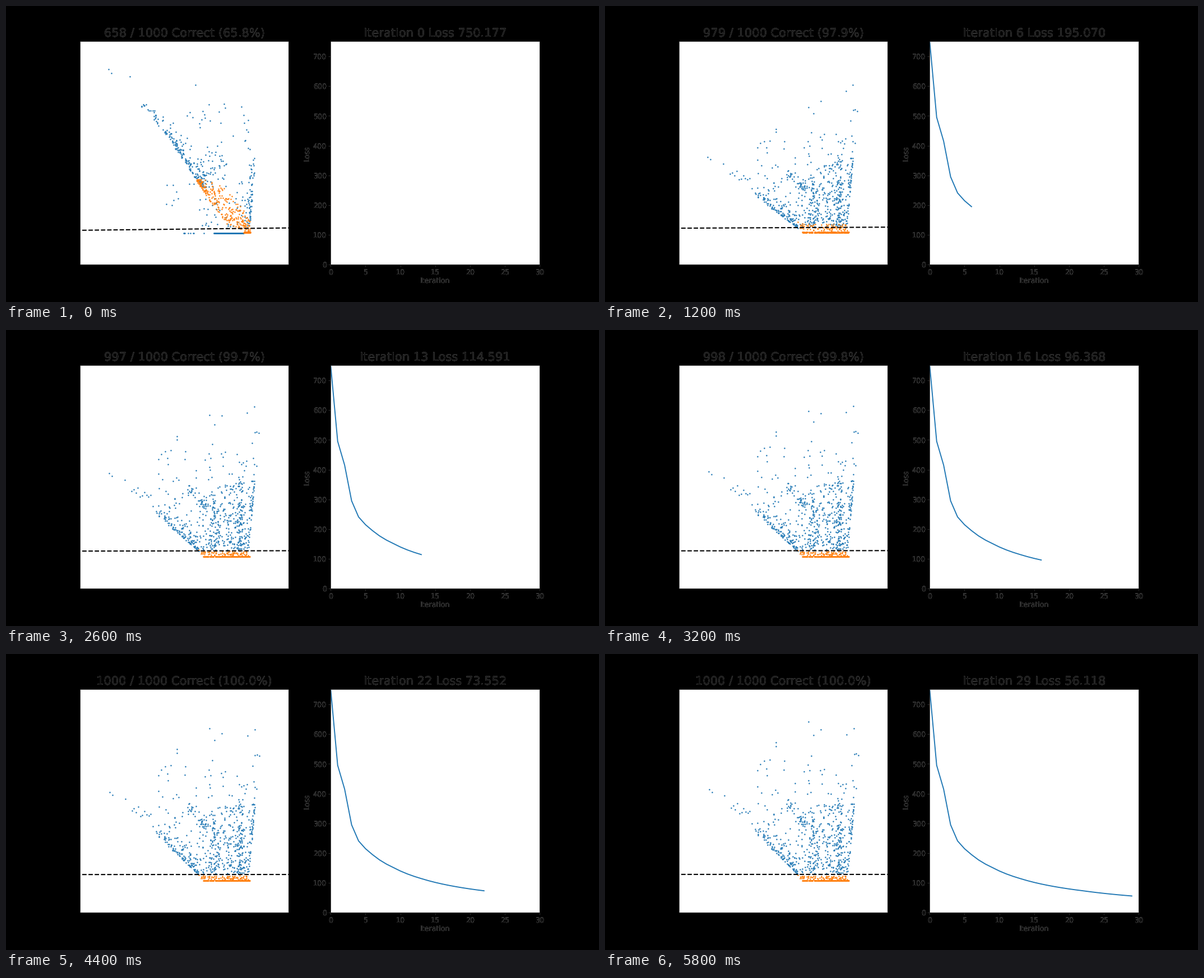
Write a matplotlib script that moves like this. It is 1058 by 529 pixels and loops after 6000 ms.

```python
import numpy as np
import matplotlib.pyplot as plt
from matplotlib.animation import FuncAnimation

W, H, STEPS = 1058, 529, 30
BLUE, ORANGE, DIM = "#1f77b4", "#ff7f0e", "#262626"
FLOOR = 405.5
N_BLUE, N_ORANGE = 640, 330
rng = np.random.default_rng(7)


def loss_at(t):
    keys = [0, 1, 2, 3, 4, 6, 9, 13, 19, 22, 29]
    vals = [750.177, 495.3, 415.2, 295.3, 241.1, 195.070, 151.627, 114.591,
            83.363, 73.552, 56.118]
    return np.exp(np.interp(np.log1p(t), np.log1p(keys), np.log(vals)))


def correct_at(t):
    return round(np.interp(t, [0, 1, 3, 6, 9, 13, 19], [658, 803, 934, 979, 992, 997, 1000]))


def early(t):
    """Share of the untrained layout left at iteration t."""
    base = loss_at(6)
    return max(0, (loss_at(t) - base) / (loss_at(0) - base))


def settle(t):
    """Progress of the slow drift after iteration 6."""
    return max(0, (t - 6) / 23) ** 0.6


def pack(x, y):
    return np.column_stack(np.broadcast_arrays(x, y))


def cluster(n, x0, x1, y0, y1):
    return pack(rng.uniform(x0, x1, n), rng.uniform(y0, y1, n))


def by_x(*parts):
    p = np.vstack(parts)
    return p[np.argsort(p[:, 0], kind="stable")]


def blue_start():
    lone = [(183, 113), (188, 120), (221, 126), (338, 141)]
    x = 226 + 127 * rng.beta(1.9, 1.1, 190)
    y = np.interp(x, [226, 265, 295, 325, 353], [162, 207, 245, 290, 330])
    ridge = pack(x + rng.exponential(7, 190), y - rng.exponential(3, 190))
    y = 270 + 128 * rng.beta(1.5, 1, 85)
    side = pack(447 - (y - 270) * 0.1 - rng.exponential(9, 85), y)
    parts = [lone, ridge, side,
             cluster(34, 320, 450, 175, 265), cluster(40, 340, 402, 265, 312),
             cluster(9, 285, 335, 310, 362), cluster(25, 338, 412, 340, 396),
             cluster(9, 317, 354, FLOOR, FLOOR)]
    rest = N_BLUE - sum(map(len, parts))
    return by_x(*parts, cluster(rest, 371, 424, FLOOR, FLOOR))


def blue_end():
    lone = [(363, 121), (385, 135), (372, 145), (431, 144), (444, 133), (452, 181),
            (305, 158), (305, 165), (186, 242), (191, 247), (213, 253)]
    x = np.linspace(225, 262, 11)
    tail = pack(x, 276 + (x - 225) * 0.75 - rng.uniform(0, 20, 11))
    x = 261 + 83 * rng.beta(1.7, 1, 150)
    edge = 312 + (x - 261)
    up = np.where(rng.random(150) < 0.7, rng.exponential(10, 150),
                  (edge - 265) * rng.random(150))
    fan = pack(x, edge - up)
    s = rng.random(26)
    streak = pack(322 + 35 * s, 258 + 50 * s) + rng.normal(0, 3, (26, 2))
    y = rng.uniform(255, 391, 50)
    side = pack(446 - (y - 255) * 0.09 - rng.exponential(1.8, 50), y)
    sky = cluster(42, 272, 450, 178, 255)
    cols = [pack(rng.normal(c, sd, n), 392 - top * rng.beta(1, 1.4, n))
            for c, sd, n, top in [(372, 4, 50, 110), (418, 3, 70, 140), (403, 7, 60, 140)]]
    parts = [lone, tail, fan, streak, side, sky, *cols]
    n = N_BLUE - sum(map(len, parts))
    fill = pack(rng.uniform(345, 436, n), 392 - 130 * rng.beta(1, 1.3, n))
    return by_x(*parts, fill)


def orange_start():
    n = N_ORANGE - 60
    x = rng.uniform(340, 435, n)
    top = np.interp(x, [340, 380, 410, 435], [309, 314, 342, 385])
    low = np.interp(x, [340, 365, 395, 435], [313, 350, 390, 404])
    body = pack(x, top + (low - top) * rng.beta(1.2, 0.8, n))
    return by_x(body, cluster(60, 423, 436, FLOOR - 2, FLOOR))


def orange_end():
    n = N_ORANGE // 4
    flat = cluster(N_ORANGE - n, 352, 435, FLOOR - 0.8, FLOOR)
    loose = cluster(n, 344, 434, FLOOR - 9, FLOOR - 2)
    loose[:, 1] -= np.maximum(0, 352 - loose[:, 0]) / 4
    return by_x(loose, flat)


B0, B1, O0, O1 = blue_start(), blue_end(), orange_start(), orange_end()
GROW = np.interp(B1[:, 0], [186, 305, 365, 385, 430], [0.83, 0.75, 0.79, 0.87, 0.97])
DRIFT = np.interp(B1[:, 0], [200, 260, 410, 440], [3, 0, 0, 2])


def blend(start, end, scale, shift, t):
    late = pack(end[:, 0] + shift, FLOOR - (FLOOR - end[:, 1]) * scale)
    w = early(t)
    return w * start + (1 - w) * late


def blue_at(t):
    u = settle(t)
    return blend(B0, B1, GROW + (1 - GROW) * u, DRIFT * (u - 1), t)


def orange_at(t):
    return blend(O0, O1, 1 + 0.8 * np.exp(-max(0, t - 6) / 4), 0, t)


def hollow(im, dpi):
    """Dark glyphs with a dim rim where the edges are soft."""
    a = im[..., 3]
    out = np.zeros(im.shape)
    out[..., :3] = (0.07 + 0.14 * np.minimum(1, 5 * a * (1 - a)))[..., None]
    out[..., 3] = a > 0.04
    return out, 0, 0


def panel(x0, x1, y0=63.4, y1=462.3):
    ax = fig.add_axes([x0 / W, 1 - y1 / H, (x1 - x0) / W, (y1 - y0) / H])
    for spine in ax.spines.values():
        spine.set_color(DIM)
    return ax


plt.rcParams["font.family"] = "DejaVu Sans"
plt.rcParams["text.hinting"] = "none"
fig = plt.figure(figsize=(14, 7), dpi=W / 14, facecolor="black")

# The cloud is drawn in stage pixels
cloud = panel(132.3, 504.3)
cloud.set(xlim=(132.3, 504.3), ylim=(462.3, 63.4), xticks=[], yticks=[])
dots = dict(ls="", marker="o", ms=2.4, mew=0)
blue, = cloud.plot([], [], color=BLUE, **dots)
orange, = cloud.plot([], [], color=ORANGE, **dots)
cut, = cloud.plot([], [], "k--", lw=2)

curve = panel(579.3, 952.3)
curve.set(xlim=(0, STEPS), ylim=(0, loss_at(0)))
curve.tick_params(labelsize=12, color="#383838")
curve.set_xlabel("Iteration", fontsize=12)
curve.set_ylabel("Loss", fontsize=12)
trace, = curve.plot([], [], color=BLUE, lw=1.8)

score = cloud.set_title("", fontsize=20, pad=7.5)
status = curve.set_title("", fontsize=20, pad=7.5)
for label in [score, status, curve.xaxis.label, curve.yaxis.label,
              *curve.get_xticklabels(), *curve.get_yticklabels()]:
    label.set_agg_filter(hollow)


def draw(t):
    blue.set_data(*blue_at(t).T)
    orange.set_data(*orange_at(t).T)
    cut.set_data([136, 515], [393.7 + 7.1 * np.exp(-t / 8), 393.8 + 2.7 * np.exp(-t / 9)])
    steps = np.arange(t + 1)
    trace.set_data(steps, loss_at(steps))
    n = correct_at(t)
    score.set_text(f"{n} / 1000 Correct ({n / 10:.1f}%)")
    status.set_text(f"Iteration {t} Loss {loss_at(t):.3f}")
    return blue, orange, cut, trace, score, status


anim = FuncAnimation(fig, draw, frames=STEPS, interval=200, repeat=True, repeat_delay=0)
plt.show()
```
